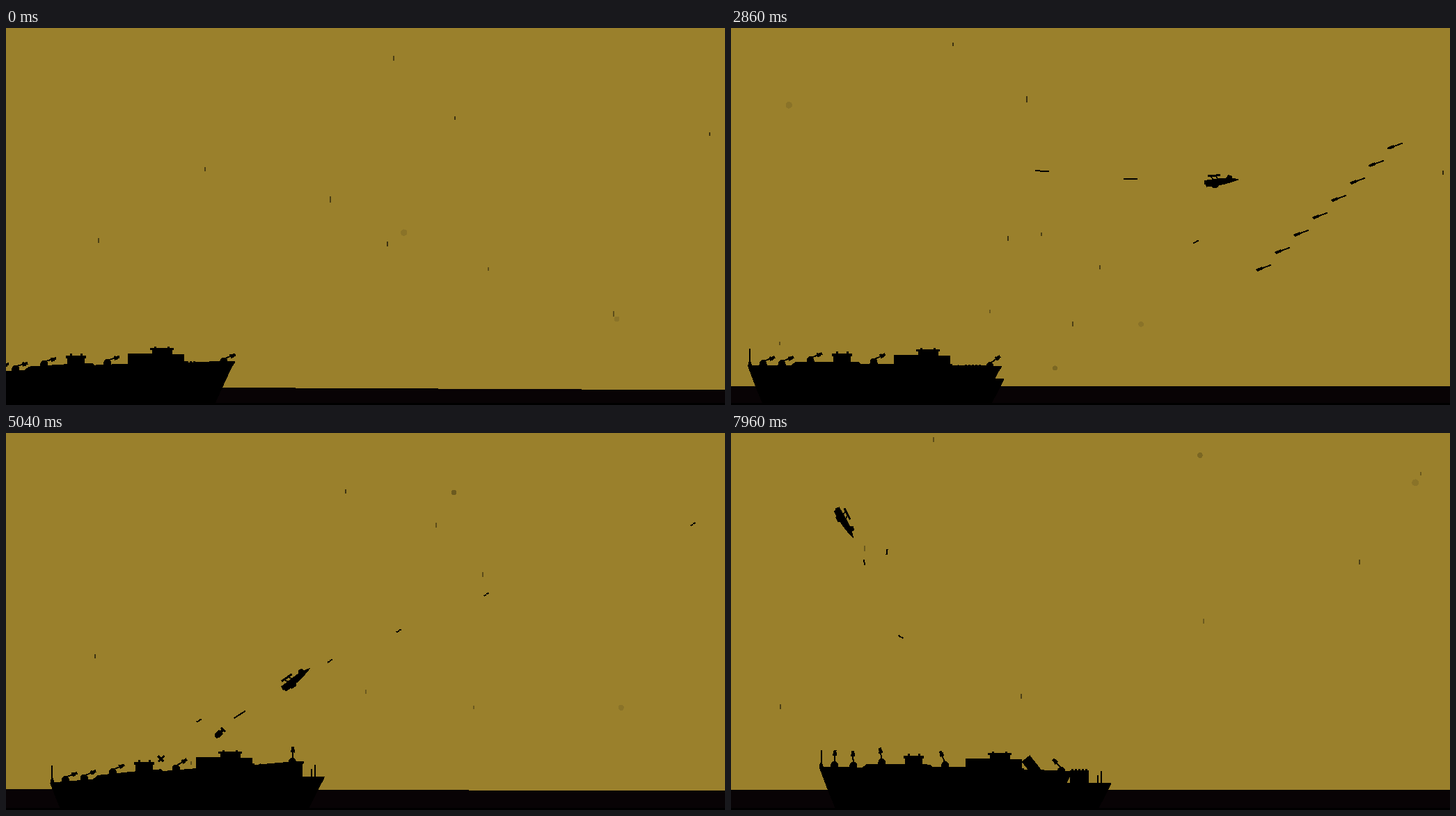
These frames come from a looping animation (1033x542 px, 8000 ms). An HTML page:

```html
<!DOCTYPE html>
<html lang="en">
<head>
<meta charset="utf-8">
<title>Ship and biplane</title>
<style>
  html, body { margin: 0; width: 100%; height: 100%; overflow: hidden; background: #9a802c; }
  svg { display: block; width: 100vw; height: 100vh; }
</style>
</head>
<body>
<svg id="stage" viewBox="0 0 1033 542" shape-rendering="crispEdges"></svg>
<script>
const LOOP = 8000, STEP = 69.83, LEAD = 20;
const KEYS = [0, 1.03, 2.86, 4.13, 5.04, 6.01, 7.96];
const stage = document.getElementById('stage');

// ---------- helpers ----------
function segment(t) {
  let i = 0;
  while (i < KEYS.length - 2 && t >= KEYS[i + 1]) i++;
  const span = KEYS[i + 1] - KEYS[i];
  return { i, span, u: Math.min(1, (t - KEYS[i]) / span) };
}
function random(seed) {
  return () => {
    seed = (seed + 0x6D2B79F5) | 0;
    let r = Math.imul(seed ^ (seed >>> 15), 1 | seed);
    r = (r + Math.imul(r ^ (r >>> 7), 61 | r)) ^ r;
    return ((r ^ (r >>> 14)) >>> 0) / 4294967296;
  };
}
const range = (n, f) => Array.from({ length: n }, (_, k) => f(k)).join('');
const wave = (t, peak, period) => Math.cos(2 * Math.PI * (t - peak) / period);
const degrees = (x, y) => Math.atan2(y, x) * 180 / Math.PI;
const r1 = v => Math.round(v * 10) / 10;
const path = d => `<path d="${d}"/>`;
const rect = (x, y, w, h, extra = '') =>
  `<rect x="${Math.round(x)}" y="${Math.round(y)}" width="${w}" height="${h}" ${extra}/>`;
const place = (x, y, deg, body) =>
  `<g transform="translate(${r1(x)} ${r1(y)}) rotate(${r1(deg)})">${body}</g>`;

// ---------- biplane: constant speed through a few waypoints ----------
const PLANE_SPEED = 147;
const WAYPOINTS = [ // x, y, descent angle at each key time
  [1118, 165, 16], [975, 205, 21], [705, 220, 4], [528, 284, 30],
  [415, 354, 35], [280, 379, -13], [164, 129, -63]
];
function planeAt(t) {
  const { i, u, span } = segment(t), [a, b] = WAYPOINTS.slice(i, i + 2);
  const tangent = ([, , deg]) => {
    const angle = deg * Math.PI / 180;
    return [-Math.cos(angle) * PLANE_SPEED * span, Math.sin(angle) * PLANE_SPEED * span];
  };
  const m0 = tangent(a), m1 = tangent(b);
  const [[x, vx], [y, vy]] = [0, 1].map(k => {
    const d = b[k] - a[k], c2 = 3 * d - 2 * m0[k] - m1[k], c3 = m0[k] + m1[k] - 2 * d;
    return [a[k] + u * (m0[k] + u * (c2 + u * c3)), m0[k] + u * (2 * c2 + 3 * u * c3)];
  });
  return { x, y, angle: Math.atan2(vy, vx), deg: degrees(-vx, -vy) };
}
const PLANE =
  path('M-24-3L-20-3L-2-4L7-4L10-8L15-7L16-3L25-1V0L14 3L4 5L-4 6L-6 9H-13L-14 7H-22L-23 4L-25 3Z') +
  path('M-19-10H-1V-7H-6L-4-3H-6L-8-7H-13L-11-3H-13L-15-7H-19Z');

// ---------- ship motion ----------
const shipX = t => -58.7 + 20 * t + 2.5 * wave(t, 1.9, 6.6);
const heave = t => -1 - 2 * wave(t, 1, 4);
const tilt = t => -.03 + .055 * wave(t, 1.9, 6.6);
const lift = (x, t) => heave(t) + tilt(t) * (x - 270);

const GUNS = [[46, 481], [73, 481], [114, 476], [205, 478], [372, 483]];
function gunAt(k, t) {
  const [x, y] = GUNS[k], plane = planeAt(t);
  const gx = x + shipX(t), gy = y + lift(x, t) - 2;
  return { x: gx, y: gy, angle: Math.atan2(plane.y + 20 - gy, plane.x - gx) };
}

// ---------- projectiles ----------
const ROCKET = path('M-11-1L-8-2H-1V-1H12V1H-1L-3 2H-9L-11 1Z');
function rockets(t) {
  return range(8, k => {
    const u = (t - 1.03) / 1.83;
    const x = 443 - 29 * k + (510 + 2 * k) * u, y = 386 + 19 * k + (6 * k - 216) * u;
    return x > 288 && x < 1050 ? place(x, y, -20, ROCKET) : '';
  });
}

const BURST = { first: 2.3, every: .28, rounds: 10, speed: 608 };
function strafing(t) {
  return range(BURST.rounds, k => {
    const fired = BURST.first + k * BURST.every, dt = t - fired;
    if (dt < .05) return '';
    const { x, y, angle, deg } = planeAt(fired), travel = BURST.speed * dt;
    const bx = x + travel * Math.cos(angle), by = y + travel * Math.sin(angle);
    if (bx < -20 || by > 484) return '';
    return by < 466 ? place(bx, by, deg, path('M-10-1H10V1H-10Z'))
      : place(bx, by, 45, rect(-6, -1, 12, 3) + rect(-1, -6, 3, 12));
  });
}

const SHOTS = [ // fire time, gun
  [1.35, 1], [2.83, 2], [3.43, 0], [3.82, 1], [4.02, 0], [4.52, 0],
  [5.6, 0], [6.05, 2], [6.75, 2], [7.2, 0], [7.28, 2], [7.29, 4]
];
function tracers(t) {
  return SHOTS.map(([fired, k]) => {
    if (t < fired + .04) return '';
    const { x, y, angle } = gunAt(k, fired), travel = 427 * (t - fired);
    return place(x + travel * Math.cos(angle), y + travel * Math.sin(angle),
      angle * 180 / Math.PI, path('M-4 0H0V-1H4V1H0V2H-4Z'));
  }).join('');
}

function bomb(t) {
  const dt = t - 5.04;
  return Math.abs(dt + .08) > .2 ? '' : place(303 - 300 * dt, 435 + 264 * dt, -45,
    path('M-8-2L-5-4H3V-2H6V-4H9V4H6V2H3V4H-5L-8 2Z'));
}

// ---------- ship ----------
const HULL = path('M24 486L25 480L28 478L30 485H86L92 480L140 479H183L186 482H318V484H362' +
  'L389 485L388 488L384 493L361 542L352 565H55L46 542L36 518Z');
const BLOCKS = [ // centre, outline
  [27, 'M26 461H28V484H26Z'],
  [160, 'M147 484V471H145V467H151V464H154V467H166V464H169V467H174V471H172V484Z'],
  [275, 'M234 490V469H269V464H266V461H272V459H275V461H291V459H294V461H300V464H298V470H315V490Z']
];
const MOUNT = path('M-6 8L-5 1L-2-2H2L5 1L6 8Z');
const BARREL = path('M0-1H10V-3H13V-2H18V2H15V3H10V1H0Z');
const PROW = path('M0 0L-1 3L-20 40L-30 62H-200L-90 0Z') + rect(-59, -18, 27, 20) +
  range(5, k => rect(-57 + k * 5, -20, 3, 3)) + rect(-20, -11, 2, 12) + rect(-15, -17, 2, 18);

function ship(t) {
  const x0 = shipX(t), slope = tilt(t);
  let out = `<g transform="matrix(1 ${slope} 0 1 ${x0} ${heave(t) - slope * 270})">${HULL}</g>`;
  for (const [cx, d] of BLOCKS) out += place(x0, Math.round(lift(cx, t)), 0, path(d));
  GUNS.forEach((_, k) => {
    const { x, y, angle } = gunAt(k, t);
    out += place(x, y, 0, MOUNT) + place(x, y, angle * 180 / Math.PI, BARREL);
  });
  // A launcher rises from the foredeck late in the scene.
  const raise = Math.min(1, Math.max(0, (t - 6.5) / 1));
  out += place(329 + x0, 499 - 20 * raise + lift(329, t), 52, rect(-14, -8, 28, 15));
  // The forward hull slides out from under the bow.
  return out + place(306 + 30.2 * t, 503 + heave(t) + 70 * slope, 0, PROW);
}

// ---------- sea and film dust ----------
const SEA_TILT = [5, -3, 0, -1, 2, 6, -1];
function sea(t) {
  const { i, u } = segment(t);
  const lean = (SEA_TILT[i] + (SEA_TILT[i + 1] - SEA_TILT[i]) * u) / 2;
  const level = Math.max(513, 518 - .95 * t);
  return `<path fill="#080305" d="M0 ${level - lean}L1033 ${level + lean}V542H0Z"/>` + rect(0, 539, 1033, 3);
}
function dust(n) {
  const rnd = random(n * 7919 + 11);
  const ticks = range(6 + Math.floor(rnd() * 6), () =>
    rect(rnd() * 1033, rnd() * 505, 2, 5 + Math.floor(rnd() * 5), `opacity="${r1(.3 + rnd() * .4)}"`));
  const blobs = range(1 + Math.floor(rnd() * 3), () =>
    `<circle cx="${r1(rnd() * 1033)}" cy="${r1(rnd() * 510)}" r="${r1(3 + rnd() * 2)}" opacity="${r1(.1 + rnd() * .2)}"/>`);
  return ticks + blobs;
}

function draw(ms) {
  const n = Math.floor((ms + LEAD) / STEP), t = n * STEP / 1000;
  const plane = planeAt(t);
  stage.innerHTML = '<rect width="1033" height="542" fill="#9a802c"/>' + dust(n) + sea(t) +
    rockets(t) + strafing(t) + tracers(t) + bomb(t) + ship(t) +
    place(plane.x, plane.y, plane.deg, PLANE);
}

const start = performance.now();
function tick() {
  draw((performance.now() - start) % LOOP);
  requestAnimationFrame(tick);
}
tick();
</script>
</body>
</html>
```
